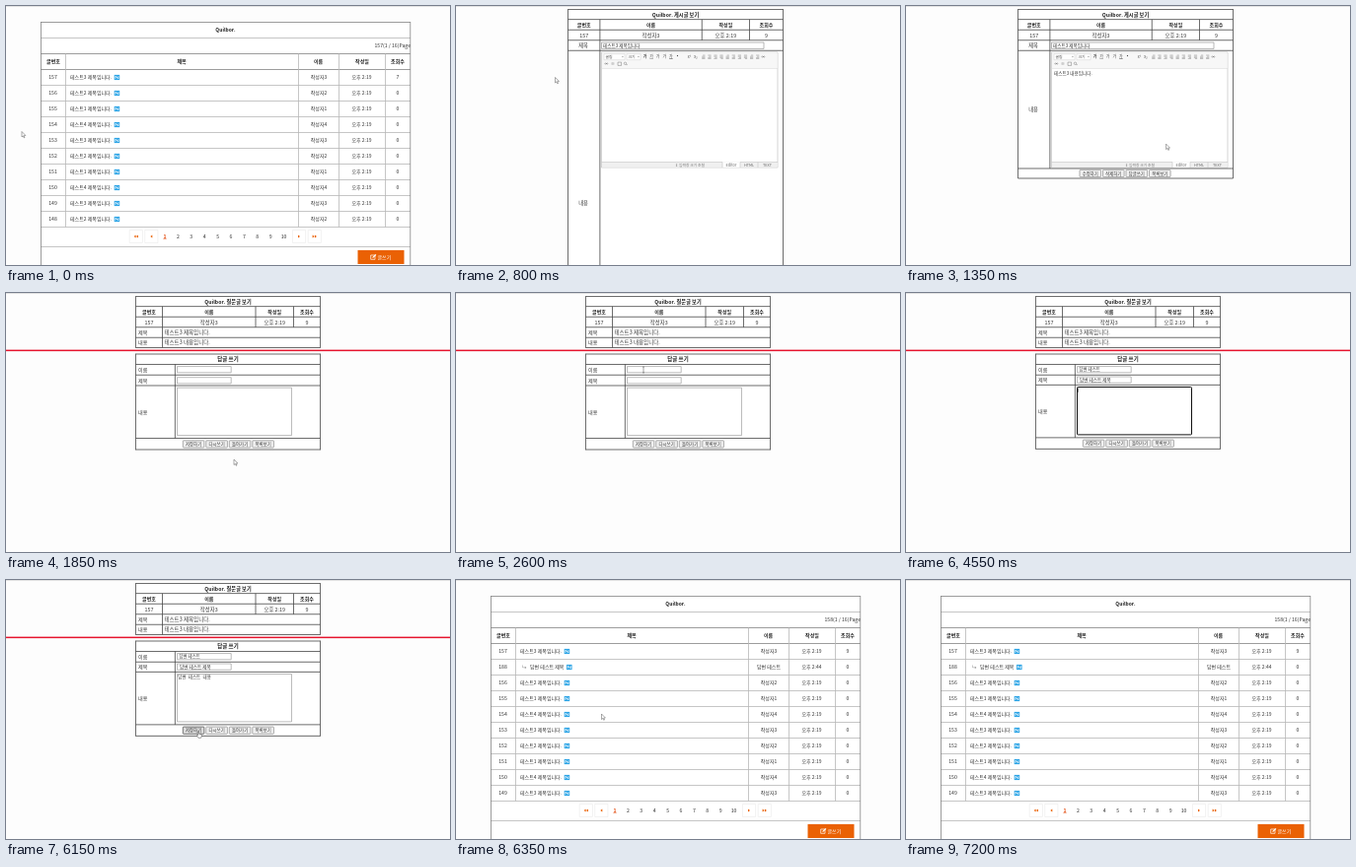
An HTML page with a canvas for the animation above (7600 ms loop, 450x263 px).

```html
<!DOCTYPE html>
<html lang="ko">
<head>
<meta charset="utf-8">
<title>게시판 답글 쓰기</title>
<style>
html, body { margin: 0; width: 100%; height: 100%; overflow: hidden; background: #fdfdfd; }
canvas { display: block; width: 450px; height: 263px; }
</style>
</head>
<body>
<canvas id="stage"></canvas>
<script>
const W = 450, H = 263, LOOP = 7600, STEP = 50;
const SANS = '"Noto Sans CJK KR", "Noto Sans CJK JP", "Noto Sans", sans-serif';
const MONO = '"Noto Sans Mono CJK KR", "Noto Sans CJK KR", "Noto Sans Mono", monospace';
const BOARD = 'Quilbor.';
const ORANGE = '#ea6104';
const canvas = document.getElementById('stage');
const ctx = canvas.getContext('2d');
const dpr = window.devicePixelRatio || 1;
canvas.width = W * dpr;
canvas.height = H * dpr;

// ---------- drawing helpers ----------
function box(x, y, w, h, color) {
  ctx.fillStyle = color;
  ctx.fillRect(x, y, w, h);
}
function frame(x, y, w, h, line, fill, lw = 0.7, r = 0) {
  ctx.beginPath();
  ctx.roundRect(x, y, w, h, r);
  if (fill) { ctx.fillStyle = fill; ctx.fill(); }
  ctx.strokeStyle = line;
  ctx.lineWidth = lw;
  ctx.stroke();
}
const hline = (x0, x1, y, color, lw = 0.8) => box(x0, y - lw / 2, x1 - x0, lw, color);
const vline = (x, y0, y1, color, lw = 0.8) => box(x - lw / 2, y0, lw, y1 - y0, color);

function poly(points, fill, line, lw = 0.45) {
  ctx.beginPath();
  points.forEach(([x, y], i) => i ? ctx.lineTo(x, y) : ctx.moveTo(x, y));
  ctx.closePath();
  if (fill) { ctx.fillStyle = fill; ctx.fill(); }
  if (line) {
    ctx.strokeStyle = line;
    ctx.lineWidth = lw;
    ctx.lineJoin = 'round';
    ctx.stroke();
  }
}

// Set type ten times larger and scale down, so that advances stay fractional;
// the trace of rotation switches off hinting. y is the middle of the line.
function text(str, x, y, o = {}) {
  const { size = 5, align = 'left', weight = 400, color = '#333', family = SANS } = o;
  ctx.save();
  ctx.translate(x, y + size * 0.38);
  ctx.rotate(0.0004);
  ctx.scale(0.1, 0.1);
  ctx.font = `${weight} ${size * 10}px ${family}`;
  ctx.textAlign = align;
  ctx.fillStyle = color;
  ctx.fillText(str, 0, 0);
  const width = ctx.measureText(str).width / 10;
  ctx.restore();
  return width;
}
const mid = (str, x, y, o) => text(str, x, y, { align: 'center', ...o });
const head = (str, x, y, o) => mid(str, x, y, { weight: 700, color: '#1c1c1c', ...o });

// ---------- timing ----------
function along(path, t) {
  if (t <= path[0][0]) return path[0].slice(1);
  for (let i = 1; i < path.length; i++) {
    const [t1, x1, y1] = path[i];
    if (t < t1) {
      const [t0, x0, y0] = path[i - 1];
      const k = (t - t0) / (t1 - t0), e = k * k * (3 - 2 * k);
      return [x0 + (x1 - x0) * e, y0 + (y1 - y0) * e];
    }
  }
  return path[path.length - 1].slice(1);
}

// Hangul appears key by key: initial, vowel, final.
const INITIALS = 'ㄱㄲㄴㄷㄸㄹㅁㅂㅃㅅㅆㅇㅈㅉㅊㅋㅌㅍㅎ';
function stages(ch) {
  const s = ch.charCodeAt(0) - 0xAC00;
  if (s < 0) return [ch];
  const out = [INITIALS[Math.floor(s / 588)], String.fromCharCode(0xAC00 + s - s % 28)];
  if (s % 28) out.push(ch);
  return out;
}
function typed(str, t, start, end) {
  if (t < start) return '';
  const keys = [];
  let done = '';
  for (const ch of str) {
    for (const part of stages(ch)) keys.push(done + part);
    done += ch;
  }
  const n = Math.floor((t - start) / (end - start) * (keys.length - 1));
  return keys[Math.min(n, keys.length - 1)];
}

// ---------- pointer ----------
const MOVES = [
  [150, 16, 127.5], [650, 100.5, 72.5], [950, 100.5, 72.5], [1100, 150, 62], [1300, 275, 130],
  [1450, 231, 169], [2000, 231, 169], [2150, 284, 192], [2400, 166, 122], [2600, 190, 75],
  [5650, 190, 75], [6100, 195, 154], [6250, 195, 154], [6450, 100, 118], [6600, 100, 118],
  [6800, 82, 71], [7200, 378, 251]
];
function arrow(x, y) {
  const shape = [[0, 0], [0, 5.5], [1.3, 4.4], [2.2, 6.3], [3, 6], [2.2, 4.1], [3.9, 4]];
  poly(shape.map(([a, b]) => [x + a, y + b]), '#fff', '#444');
}
function hand(x, y) {
  const shape = [[-0.6, 0], [0.5, 0], [0.6, 2.2], [3.2, 2.8], [3.4, 4.6], [2.7, 6.3], [0, 6.3], [-1.6, 4], [-1.1, 3.5], [-0.6, 4]];
  poly(shape.map(([a, b]) => [x + a, y + b]), '#fff', '#333');
}
function beam(x, y) {
  vline(x, y, y + 6, '#444', 0.5);
  hline(x - 1, x + 1, y, '#444', 0.4);
  hline(x - 1, x + 1, y + 6, '#444', 0.4);
}
function pointer(t, x, y, overLink) {
  if (t >= 7200 || (t >= 2900 && t < 5650)) return;
  const onButton = (t >= 1450 && t < 1850) || (t >= 6050 && t < 6300) || t >= 7150;
  const onField = (t >= 2550 && t < 2900) || (t >= 5650 && t < 5750);
  (onButton || overLink ? hand : onField ? beam : arrow)(x, y);
}

// ---------- list page ----------
function badge(x, y) {
  box(x, y - 2.5, 5.5, 5.2, '#2ca4e6');
  ctx.beginPath();
  ctx.moveTo(x + 1.3, y + 1.4);
  ctx.lineTo(x + 1.3, y - 1.2);
  ctx.lineTo(x + 4.2, y + 1.4);
  ctx.lineTo(x + 4.2, y - 1.2);
  ctx.strokeStyle = '#fff';
  ctx.lineWidth = 0.75;
  ctx.stroke();
}
function pageArrow(x, y, dir, count) {
  frame(x - 6.6, y - 6.5, 13.2, 13, '#ececec', '#fff', 0.7);
  for (let i = 0; i < count; i++) {
    const cx = x + (i - (count - 1) / 2) * 2.3;
    poly([[cx + dir, y], [cx - dir, y - 1.5], [cx - dir, y + 1.5]], ORANGE);
  }
}
function listPage(replied, px, py, live) {
  const edge = '#858585', rule = '#b8b8b8';
  let over = false;
  box(35, 16, 375, 247, '#fff');
  for (let i = 0; i < 14; i++) hline(35, 410, 16.5 + i * 16, i === 0 || i === 2 || i === 3 ? edge : rule);
  hline(35, 410, 244.5, rule);
  [60.5, 296.5, 337.5, 384.5].forEach(x => vline(x, 48.5, 224.5, rule));
  vline(35.5, 16, H, edge);
  vline(409.8, 16, H, edge);

  head(BOARD, 222.5, 24.5);
  text(`${replied ? 158 : 157}(1 / 16)Page`, 410, 40.5, { size: 5.15, align: 'right' });
  [['글번호', 48], ['제목', 178], ['이름', 316.5], ['작성일', 361], ['조회수', 397]]
    .forEach(([s, x]) => head(s, x, 56.5));

  for (let i = 0; i < 10; i++) {
    const y = 72.4 + i * 16, reply = replied && i === 1;
    const id = 157 - (replied && i > 1 ? i - 1 : i);
    const who = (id + 1) % 4 + 1;
    const label = reply ? '답변 테스트 제목' : `테스트${who} 제목입니다.`;
    const x = reply ? 75 : 65;
    mid(reply ? '188' : String(id), 47.5, y, { size: 5.2 });
    const w = text(label, x, y);
    badge(x + w + 2.6, y);
    if (live && px > x && px < x + w && Math.abs(py - y) < 3) {
      over = true;
      hline(x, x + w, y + 2.9, '#333', 0.5);
    }
    if (reply) {
      vline(67.5, y - 2, y + 0.5, '#999', 0.5);
      hline(67.5, 71, y + 0.5, '#999', 0.5);
      poly([[71.5, y + 0.5], [69.8, y - 0.6], [69.8, y + 1.6]], '#999');
    }
    mid(reply ? '답변 테스트' : `작성자${who}`, 317, y);
    mid(reply ? '오후 2:44' : '오후 2:19', 360.5, y);
    mid(i ? '0' : replied ? '9' : '7', 397, y, { size: 5.2 });
  }

  const y = 234;
  pageArrow(131.8, y, -1, 2);
  pageArrow(147.3, y, -1, 1);
  for (let n = 1; n <= 10; n++) {
    const x = 161 + (n - 1) * 13.4;
    mid(String(n), x, y, n === 1 ? { size: 5.2, weight: 700, color: '#e2490b' } : { size: 5.2 });
  }
  hline(159.4, 162.6, 236.8, '#e2490b', 0.5);
  pageArrow(297, y, 1, 1);
  pageArrow(312.8, y, 1, 2);

  box(356.5, 248, 47, 14, ORANGE);
  frame(369.7, 253, 4.3, 4.3, '#fff', null, 0.7);
  poly([[371.4, 256], [371.7, 254.7], [374.5, 251.9], [375.4, 252.8], [372.6, 255.6]], '#fff');
  text('글쓰기', 376.5, 255, { weight: 500, color: '#fff' });
  return over;
}

// ---------- detail pages ----------
const INK = '#484848';

// Title, column heads and the values below them.
function postHead(title, xs) {
  const [l, a, b, c, r] = xs;
  [3.5, 13.7, 24.2, 34.8, 45.2].forEach(y => hline(l, r, y, INK));
  [a, b, c].forEach(x => vline(x, 13.7, 34.8, INK));
  head(`${BOARD} ${title}`, (l + r) / 2, 8.7, { size: 5.2 });
  const cells = [['글번호', '157'], ['이름', '작성자3'], ['작성일', '오후 2:19'], ['조회수', '9']];
  cells.forEach(([name, value], i) => {
    const x = (xs[i] + xs[i + 1]) / 2;
    head(name, x, 19);
    mid(value, x, 29.6, { size: 5.4 });
  });
}
function button(label, x, y, hot) {
  frame(x, y, 21.6, 7.2, hot ? '#444' : '#8c8c8c', hot ? '#dcdcdc' : '#f0f0f0', 0.7, 0.7);
  mid(label, x + 10.8, y + 3.6, { size: 4.4 });
}
const buttons = (labels, x, y, hot) => labels.forEach((s, i) => button(s, x + i * 23.5, y, i === hot));

function editor() {
  const line = '#c2c2c2', icon = '#777', small = { size: 3.9, color: '#555' };
  frame(147.5, 47, 178.5, 117, line, '#fff');
  box(148, 47.4, 177.6, 15.8, '#f7f7f7');
  hline(147.5, 326, 63.3, '#dcdcdc', 0.6);
  [['굴림', 150, 21], ['크기', 173, 14]].forEach(([s, x, w]) => {
    frame(x, 48.7, w, 6, '#d0d0d0', '#fff', 0.5);
    text(s, x + 1.5, 51.6, small);
    poly([[x + w - 3, 51.2], [x + w - 1.2, 51.2], [x + w - 2.1, 52.3]], icon);
  });
  for (let i = 0; i < 6; i++) {
    const x = 191.5 + i * 6.6;
    mid('가가가가가▪'[i], x, 51.5, { size: 4, weight: i ? 400 : 700, color: '#444' });
    if (i === 1 || i === 4) hline(x - 1.8, x + 1.8, 53.7, i === 4 ? '#333' : icon, 0.5);
  }
  mid('x²', 236.5, 51.5, small);
  mid('x₂', 243, 51.5, small);
  for (let i = 0; i < 10; i++) {
    const x = 249.2 + i * 6.1;
    for (let k = 0; k < 4; k++) hline(x + (i % 4 === k ? 1 : 0), x + 3.2, 50 + k * 1.1, icon, 0.45);
  }
  mid('∞', 311.5, 51.6, small);
  mid('∞', 152.5, 58.6, small);
  mid('※', 159, 58.6, small);
  frame(164, 57.1, 3.6, 3.3, icon, null, 0.5);
  ctx.beginPath();
  ctx.arc(171.5, 58.3, 1.2, 0, 7);
  ctx.stroke();
  hline(172.3, 173.8, 59.8, icon, 0.5);

  box(148, 158.7, 177.6, 5, '#f0f0f0');
  hline(147.5, 326, 158.6, line, 0.6);
  mid('⇕ 입력창 크기 조절', 237, 161.3, { size: 3.8, color: '#777' });
  box(270, 158.2, 18, 5.6, '#fff');
  [270, 288, 306].forEach(x => vline(x, 158.6, 164, line, 0.6));
  [['Editor', 279], ['HTML', 297], ['TEXT', 315.5]].forEach(([s, x]) => mid(s, x, 161.2, { size: 3.8, color: '#666' }));
}

function viewPage(t) {
  const loaded = t >= 850, bottom = loaded ? 165 : H;
  box(113.5, 3.5, 218, (loaded ? 175 : H) - 3.5, '#fff');
  postHead('게시글 보기', [113.5, 145.9, 249.2, 297.5, 331.5]);
  vline(145.9, 34.8, bottom, INK);
  [113.5, 331.5].forEach(x => vline(x, 3.1, loaded ? 175 : H, INK));
  mid('제목', 129, 40, { size: 5.2 });
  mid('내용', 129, loaded ? 105 : 200, { size: 5.2 });
  frame(147.5, 37, 164.5, 6.4, '#999', '#fff', 0.7);
  text('테스트3 제목입니다', 149, 40.2, { size: 4.6 });
  editor();
  if (!loaded) return;
  text('테스트3 내용입니다.', 150, 68, { size: 4.6 });
  hline(113.5, 331.5, 165, INK);
  hline(113.5, 331.5, 175, INK);
  buttons(['수정하기', '삭제하기', '답글쓰기', '목록보기'], 176, 166.4, t >= 1450 ? 2 : -1);
}

// An input or text area with its value and, when focused, a caret.
function field(x, y, w, h, value, focused, o = {}) {
  const { size = 4.4, dx = 2, top = h / 2, family = SANS } = o;
  frame(x, y, w, h, focused ? '#111' : '#a0a0a0', '#fff', focused ? 1 : 0.7, focused ? 0.8 : 0);
  const width = value ? text(value, x + dx, y + top, { size, family }) : 0;
  if (focused) vline(x + dx + width + 0.3, y + top - 2.3, y + top + 2.3, '#111', 0.5);
}

function replyPage(t) {
  const l = 131.5, r = 318.5, up = t >= 3650 ? 0.7 : 0;
  box(l, 3.5, r - l, 52, '#fff');
  postHead('질문글 보기', [l, 158.5, 253, 291.5, r]);
  hline(l, r, 55.4, INK);
  vline(158.5, 34.8, 55.4, INK);
  [l, r].forEach(x => vline(x, 3.1, 55.8, INK));
  [['제목', 40], ['내용', 50.3]].forEach(([s, y]) => {
    text(s, 134, y, { size: 5.1 });
    text(`테스트3 ${s}입니다.`, 160.5, y, { size: 5.5 });
  });

  box(0, 57.6, W, 1.5, '#e6142e');

  box(l, 62, r - l, 97 - up, '#fff');
  [62, 72.4, 83.2, 94 - up, 147.6 - up, 159 - up].forEach(y => hline(l, r, y, INK));
  [l, r].forEach(x => vline(x, 61.6, 159.4 - up, INK));
  vline(171.3, 72.4, 147.6 - up, INK);
  head('답글 쓰기', 225, 67.2, { size: 5.5 });
  [['이름', 77.7], ['제목', 88.8 - up], ['내용', 121 - up]].forEach(([s, y]) => text(s, 134, y, { size: 5.1 }));

  field(173.5, 74.6, 54.7, 6.2, typed('답변 테스트', t, 3100, 3580), t >= 2750 && t < 3850);
  field(173.5, 85.7 - up, 54.7, 6.2, typed('답변 테스트 제목', t, 3900, 4450),
    t >= 3850 && t < 4500, { size: 4.6, dx: 2.6 });
  field(173.5, 96.2 - up, 116, 48.4, typed('답변 테스트 내용', t, 4700, 5400),
    t >= 4500 && t < 6150, { size: 4.5, dx: 0.8, top: 3, family: MONO });
  buttons(['저장하기', '다시쓰기', '돌아가기', '목록보기'], 179.3, 149.8 - up, t >= 6050 ? 0 : -1);
}

// ---------- loop ----------
function draw(t) {
  ctx.setTransform(dpr, 0, 0, dpr, 0, 0);
  box(0, 0, W, H, '#fdfdfd');
  box(0, 0, W, 1, '#e4e4e4');
  const [x, y] = along(MOVES, t);
  let over = false;
  if (t < 750) over = listPage(false, x, y, true);
  else if (t < 1750) viewPage(t);
  else if (t < 6300) replyPage(t);
  else over = listPage(true, x, y, t < 7200);
  pointer(t, x, y, over);
}

const began = performance.now();
function tick() {
  const t = (performance.now() - began) % LOOP;
  draw(Math.floor(t / STEP) * STEP);
  requestAnimationFrame(tick);
}
tick();
</script>
</body>
</html>
```
